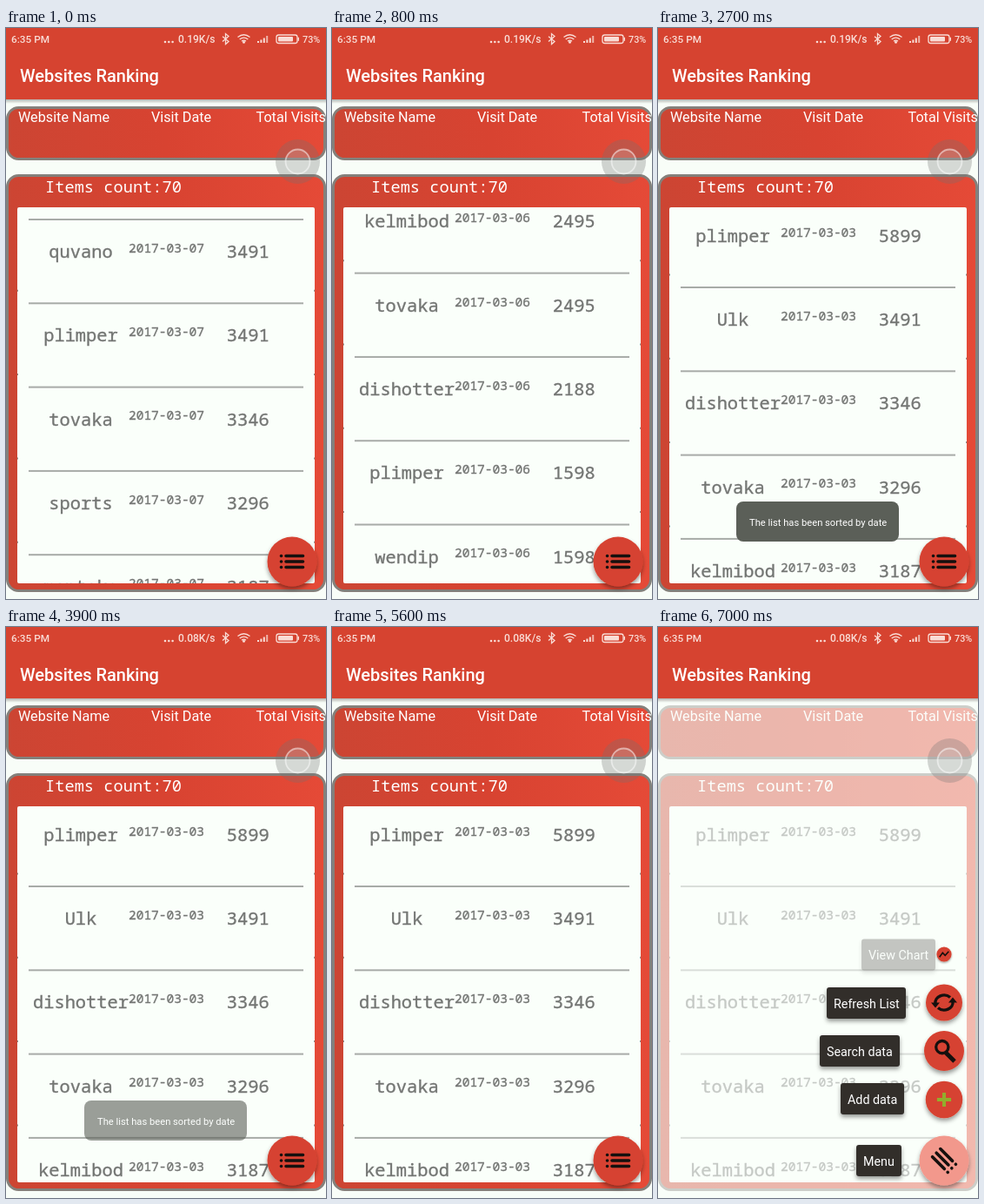
These frames come from a looping animation (368x656 px, 7.1 s). An HTML page:

```html
<!DOCTYPE html>
<html lang="en">
<head>
<meta charset="utf-8">
<title>Websites Ranking</title>
<style>
html, body { margin: 0; width: 100%; height: 100%; overflow: hidden; background: #f8fdf8; }
svg { display: block; width: 100%; height: 100%; }
text { font-family: Roboto, sans-serif; fill: #fff; white-space: pre; }
.mono { font-family: "Noto Sans Mono", "DejaVu Sans Mono", monospace; }
.row text { fill: #737573; stroke: #737573; stroke-width: .35; font-size: 20.4px; text-anchor: middle; }
.row .date { font-size: 14.5px; }
.status text { fill: #f9dcd5; font-weight: 500; }
.head { font-size: 16.2px; }
.label { font-size: 14.3px; }
</style>
</head>
<body>
<svg viewBox="0 0 368 656" xmlns="http://www.w3.org/2000/svg">
  <defs>
    <linearGradient id="red">
      <stop offset="0" stop-color="#cc4533"/>
      <stop offset=".5" stop-color="#d84331"/>
      <stop offset="1" stop-color="#e54a37"/>
    </linearGradient>
    <linearGradient id="fall" x2="0" y2="1">
      <stop offset="0" stop-opacity=".28"/>
      <stop offset="1" stop-opacity="0"/>
    </linearGradient>
    <filter id="shade" x="-30%" y="-30%" width="160%" height="170%">
      <feDropShadow dx="0" dy="3" stdDeviation="2.5" flood-opacity=".4"/>
    </filter>
    <clipPath id="window"><rect x="13" y="206" width="342" height="432" rx="2"/></clipPath>
  </defs>

  <rect width="368" height="656" fill="#f8fdf8"/>
  <g fill="url(#red)" stroke="#84807b" stroke-width="3">
    <rect x="1.5" y="91.5" width="365" height="59" rx="13"/>
    <rect x="1.5" y="169.5" width="365" height="477" rx="13"/>
  </g>
  <g class="head">
    <text x="14" y="108">Website Name</text>
    <text x="167" y="108">Visit Date</text>
    <text x="287.5" y="108">Total Visits</text>
  </g>
  <text class="mono" x="45" y="188.5" font-size="18.7">Items count:70</text>
  <rect x="13" y="206" width="342" height="432" rx="2" fill="#fafffa"/>
  <g clip-path="url(#window)"><g id="list"></g></g>

  <g id="toast" opacity="0">
    <rect x="90" y="544" width="187" height="46" rx="8" fill="#5b5f58"/>
    <text x="105" y="572" font-size="11.2">The list has been sorted by date</text>
  </g>

  <rect id="veil" y="82" width="368" height="574" fill="#fafffa" opacity="0"/>

  <rect y="82" width="368" height="5" fill="url(#fall)"/>
  <rect width="368" height="82" fill="#d64330"/>
  <text x="16" y="61.7" font-size="20" font-weight="500">Websites Ranking</text>
  <g class="status">
    <text x="6" y="17" font-size="11.8">6:35 PM</text>
    <text id="speed" x="198" y="17" font-size="12"></text>
    <text x="341" y="16.8" font-size="10.8">73%</text>
    <g fill="#f9dcd5">
      <circle cx="183" cy="16" r="1.3"/><circle cx="187.3" cy="16" r="1.3"/><circle cx="191.6" cy="16" r="1.3"/>
      <path d="M289 15h2v2h-2zM292.4 13.5h2v3.500h-2zM295.800 11.500h2v5.500h-2z"/>
      <path d="M299.200 9h2v8h-2z" opacity=".75"/>
      <rect x="313" y="10" width="17" height="5.500" rx="1"/>
      <rect x="335.500" y="10.800" width="1.500" height="4"/>
      <circle cx="273.500" cy="16.300" r="1.500"/>
    </g>
    <g fill="none" stroke="#f9dcd5" stroke-width="1.300">
      <rect x="311" y="8" width="24" height="9.500" rx="2.500"/>
      <path d="M249 9.800l7 5.800-3.500 3v-12l3.500 3-7 5.800"/>
      <path d="M266.500 10.500q7-5.500 14 0M268.700 13q4.800-3.800 9.600 0M271 15.200q2.500-2 5 0"/>
    </g>
  </g>

  <circle cx="335.500" cy="153.500" r="25.500" fill="#707070" opacity=".3"/>
  <circle cx="335.500" cy="153.500" r="14" fill="#fff" fill-opacity=".14" stroke="#fff" stroke-opacity=".5" stroke-width="1.800"/>

  <g id="menu"></g>
  <g filter="url(#shade)"><circle id="fab" cx="329" cy="613" r="28.500"/></g>
  <g id="bars" stroke="#15100e" stroke-width="3.600" stroke-linecap="round">
    <path d="M-7 -6.500H12.500M-7 0H12.500M-7 6.500H12.500"/>
    <path d="M-12.500 -6.500h.1M-12.500 0h.1M-12.500 6.500h.1"/>
  </g>
</svg>
<script>
const LOOP = 7100, STEP = 100, PITCH = 96.3, TOP = 206;
const $ = id => document.getElementById(id);
const clamp = v => Math.max(0, Math.min(1, v));
const ramp = (t, a, b) => clamp((t - a) / (b - a));
const mix = (a, b, p) => a + (b - a) * p;
const backOut = u => 1 + 2.7 * (u - 1) ** 3 + 1.7 * (u - 1) ** 2;

// Each entry is "name visits"; a bare number starts a new day of March.
const parse = s => {
  let day;
  return s.split(",").flatMap(e => {
    const [name, visits] = e.trim().split(" ");
    if (!visits) { day = name; return []; }
    return [{ name, visits, date: "2017-03-" + day }];
  });
};
const before = parse(`05, plimper 3296, tovaka 3187, Ulk 3187, yimbo 2964, wendip 2495,
  kelmibod 2188, dishotter 1598, 06, plimper 5899, Ulk 3491, quvano 3346, sports 3296, yimbo 2964,
  kelmibod 2495, tovaka 2495, dishotter 2188, plimper 1598, wendip 1598,
  07, kelmibod 5899, quvano 3491, plimper 3491, tovaka 3346, sports 3296, meptako 3187, Ulk 2964`);
const sorted = parse(`03, plimper 5899, Ulk 3491, dishotter 3346, tovaka 3296, kelmibod 3187`);

const rowMarkup = (r, i) => `<g class="row" transform="translate(0 ${TOP + i * PITCH})">
  <text class="mono" x="86" y="39.8">${r.name}</text>
  <text class="mono date" x="184.5" y="33.6">${r.date}</text>
  <text class="mono" x="278.3" y="39.8">${r.visits}</text>
  <rect x="26" y="91" width="316" height="2" fill="#a8aba8"/>
  <path d="M13 76.500h1v2h-1zM354 76.500h1v2h-1z" fill="#8c8f8c"/></g>`;
const lists = [before, sorted].map(rows => rows.map(rowMarkup).join(""));

const stroke = (d, w) => `<path d="${d}" fill="none" stroke="#15100e" stroke-width="${w}"/>`;
const icons = {
  add: `<path d="M-2 -8h4v6h6v4h-6v6h-4v-6h-6v-4h6z" fill="#93ad2c"/>`,
  search: stroke("M7.500 -4a6.500 6.500 0 1 1 -13 0a6.500 6.500 0 1 1 13 0", 3).replace("<path", '<path transform="translate(-3 0)"')
    + stroke("M2 2L11 11", 4.500),
  refresh: stroke("M-10 1A10 8.500 0 0 1 7 -6M10 -1A10 8.500 0 0 1 -7 6", 3.400)
    + `<path d="M-15 0h10l-5 6zM15 0h-10l5 -6z" fill="#15100e"/>`,
  chart: stroke("M-13 8L-4 -4L3 3L13 -8", 4)
};

// Menu entries from the bottom up.
const items = [
  { text: "Add data", x: 210, w: 73, y: 524, cy: 543, icon: "add" },
  { text: "Search data", x: 186, w: 92, y: 469, cy: 487, icon: "search" },
  { text: "Refresh List", x: 194, w: 91, y: 414, cy: 431.5, icon: "refresh" },
  { text: "View Chart", x: 234, w: 85, y: 358.5, cy: 376, icon: "chart" },
  { text: "Menu", x: 228, w: 52, y: 595 }
];
$("menu").innerHTML = items.map(m => `<g class="item"><g class="tag" filter="url(#shade)">
  <rect x="${m.x}" y="${m.y}" width="${m.w}" height="36" rx="3" fill="#332f2c"/>
  <text class="label" x="${m.x + 8}" y="${m.y + 23.5}">${m.text}</text></g>
  ${m.icon ? `<g class="disc"><circle r="21" fill="#d64330" filter="url(#shade)"/>${icons[m.icon]}</g>` : ""}</g>`).join("");
const nodes = [...document.querySelectorAll(".item")];

function scrollAt(t) {
  if (t < 800) return mix(17.81, 12.17, t / 800);
  return 12.17 * (1 - ramp(t, 800, 1800)) ** 1.15;
}

let shown = -1;
function draw(t) {
  const which = t < 2400 ? 0 : 1;
  if (which !== shown) {
    $("list").innerHTML = lists[which];
    shown = which;
  }
  $("list").setAttribute("transform", `translate(0 ${which ? 0 : -scrollAt(t) * PITCH})`);
  $("speed").textContent = t < 3800 ? "0.19K/s" : "0.08K/s";
  $("toast").setAttribute("opacity", ramp(t, 2400, 2700) * (1 - ramp(t, 3700, 4200)));

  const open = ramp(t, 6800, 7000), press = ramp(t, 6500, 6700);
  $("veil").setAttribute("opacity", .61 * open);
  $("fab").setAttribute("fill", `rgb(${mix(mix(214, 226, press), 242, open)},${mix(mix(67, 79, press), 152, open)},${mix(mix(49, 63, press), 140, open)})`);
  $("bars").setAttribute("transform", `translate(329 613) rotate(${225 * open})`);

  items.forEach((m, i) => {
    const u = ramp(t, 6818 + (m.icon ? i * 54 : 0), 7018 + (m.icon ? i * 54 : 0));
    const node = nodes[i];
    node.setAttribute("display", u > 0 ? "inline" : "none");
    node.querySelector(".tag").setAttribute("opacity", Math.min(1, u * 2.7));
    if (m.icon) node.querySelector(".disc").setAttribute("transform", `translate(329 ${m.cy}) scale(${Math.max(0, backOut(u))})`);
  });
}

const start = performance.now();
function tick() {
  const t = (performance.now() - start) % LOOP;
  draw(Math.floor(t / STEP) * STEP);
  requestAnimationFrame(tick);
}
tick();
</script>
</body>
</html>
```
